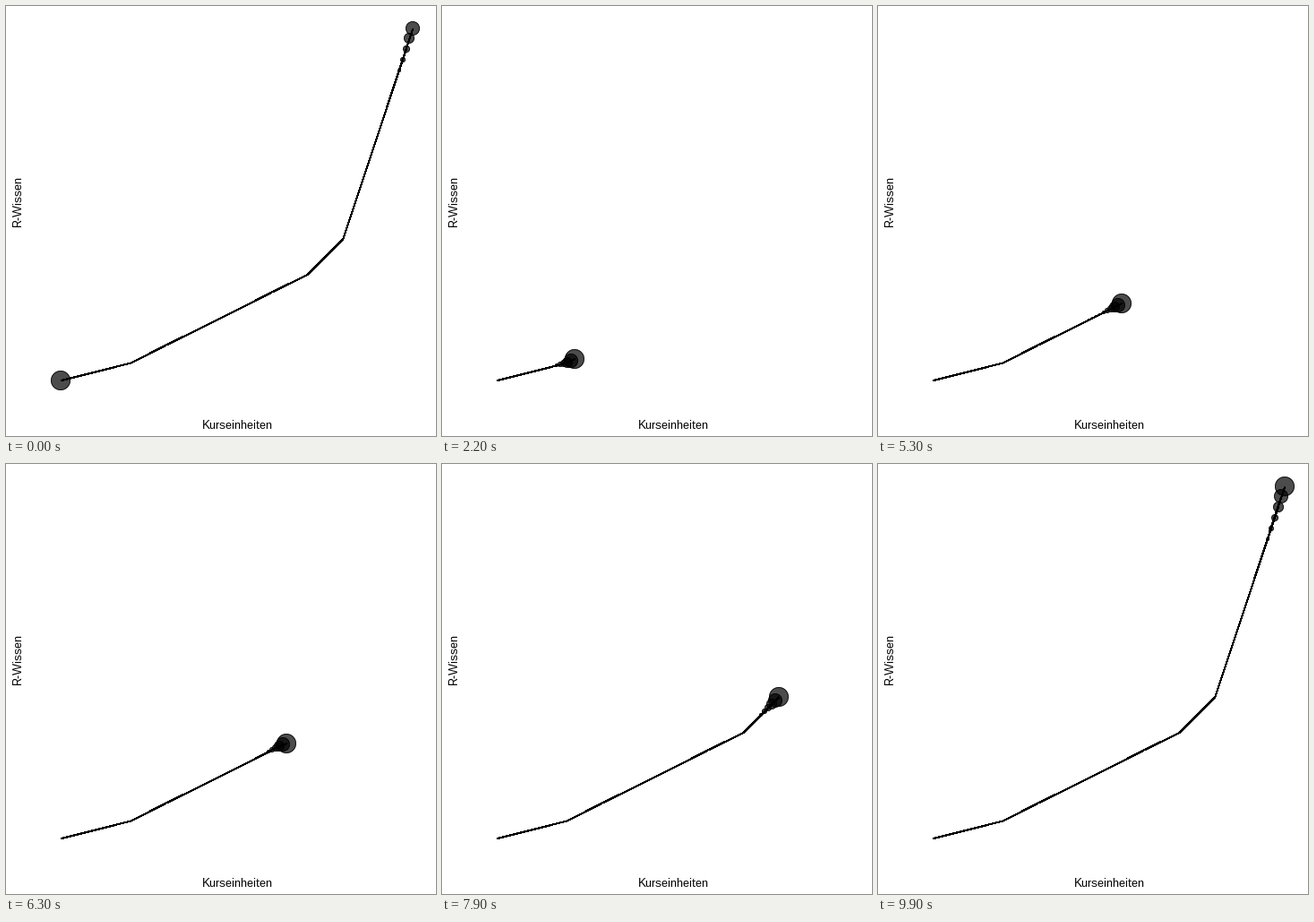
Recreate the animation shown at these times as a matplotlib script. Size 480 by 480 pixels, loop 10 s.

```python
import numpy as np
import matplotlib.pyplot as plt
from matplotlib.animation import FuncAnimation
from matplotlib.patches import Circle

SIZE, DPI = 480, 100
FRAMES, WAKE = 100, 10
PX = 72 / DPI

plt.rcParams["font.family"] = "Liberation Sans"
plt.rcParams["text.hinting"] = "native"
plt.rcParams["text.hinting_factor"] = 1

# frame at which each course unit 0..10 is reached
KNOTS = np.array([0, 10, 20, 30, 40, 49.5, 59, 69, 79, 89, 99])


def position(n):
    """Whole-pixel place of the curve at frame n, measured from top left."""
    unit = np.interp(n, KNOTS, np.arange(11))
    skill = np.interp(unit, [0, 2, 7, 8, 10], [0, 1, 6, 8, 20])
    return np.floor(61.7 + 39.32 * unit), np.floor(418.1 - 19.645 * skill)


def path(n):
    steps = np.append(KNOTS[KNOTS < n], n)
    x, y = position(steps)
    return x + 0.25, y + 0.25


fig = plt.figure(figsize=(SIZE / DPI, SIZE / DPI), dpi=DPI, facecolor="white")
ax = fig.add_axes([0, 0, 1, 1])
ax.set_xlim(0, SIZE)
ax.set_ylim(SIZE, 0)
ax.axis("off")

label = dict(fontsize=13 * PX, color="black", ha="center", va="baseline",
             rotation_mode="anchor")
ax.text(258, 472, "Kurseinheiten", **label)
ax.text(17, 218, "R-Wissen", rotation=90, **label)

# the wake shrinks with the cube of its age
wake = []
for age in range(WAKE):
    scale = (1 - age / WAKE) ** 3
    radius = max(1, np.floor(0.375 * (28.45 * scale + 0.945) + 0.5))
    # aliased strokes fill every touched pixel, about one more than asked
    width = max(1, round(2.13 * scale)) - 0.9
    z = 2 * (WAKE - age)
    line, = ax.plot([], [], color="black", lw=width * PX, antialiased=False,
                    solid_capstyle="butt", solid_joinstyle="round",
                    snap=False, zorder=z)
    disc = Circle((0, 0), radius, facecolor=(0, 0, 0, 0.7), edgecolor="none",
                  lw=0, snap=False, zorder=z + 1)
    ring = Circle((0, 0), radius - 0.5, fill=False, edgecolor=(0, 0, 0, 0.7),
                  lw=PX, snap=False, zorder=z + 1)
    ax.add_patch(disc)
    ax.add_patch(ring)
    wake.append((line, disc, ring))


def draw(frame):
    for age, (line, disc, ring) in enumerate(wake):
        n = (frame - age) % FRAMES
        line.set_data(*(path(n) if n else ([], [])))
        center = position(n)
        disc.set_center(center)
        ring.set_center(center)
    return [artist for group in wake for artist in group]


anim = FuncAnimation(fig, draw, frames=FRAMES, interval=100,
                     init_func=lambda: draw(0), repeat=True, repeat_delay=0)
plt.show()
```
